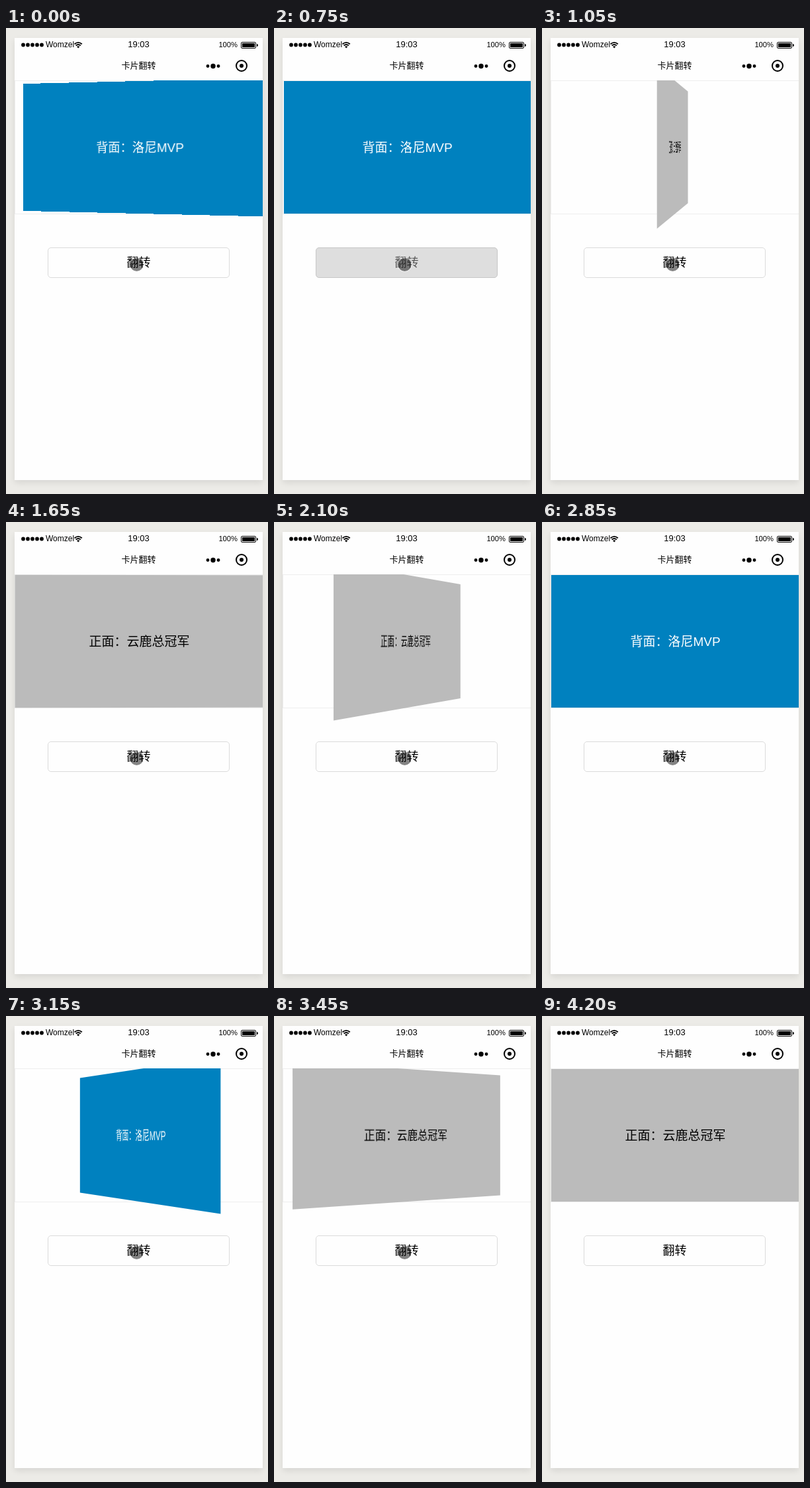
An HTML page that plays this animation: 396 by 703 pixels, repeating every 4.65 s.

```html
<!DOCTYPE html>
<html lang="zh-CN">
<head>
<meta charset="utf-8">
<title>卡片翻转</title>
<style>
  * { box-sizing: border-box; }
  html, body { margin: 0; width: 100%; height: 100%; overflow: hidden; background: #ecebe7; }
  body { position: relative; font-family: "Liberation Sans", "Noto Sans CJK SC", "Noto Sans CJK", sans-serif; }
  body * { position: absolute; }
  .phone { left: 13px; top: 15px; width: 375px; height: 667px; background: #fefefe; box-shadow: 0 4px 9px rgba(0, 0, 0, .09); }
  .page { left: 0; top: 64px; width: 375px; height: 603px; overflow: hidden; }
  .scene { left: 0; top: 0; width: 377px; height: 202px; border: 1px solid #eee; perspective: 1000px; }
  .face { left: 0; top: 0; width: 375px; height: 200px; font-size: 19px; line-height: 201px; text-align: center; backface-visibility: hidden; }
  #front { background: #bbb; color: #000; }
  #back { background: #0081bf; color: #fff; }
  #button { left: 50px; top: 252px; width: 275px; height: 46px; border: 1px solid #dbdbdb; border-radius: 5px; font-size: 18px; line-height: 44px; text-align: center; color: #000; }
  #button.pressed { background: #dedede; border-color: #c6c6c6; color: rgba(0, 0, 0, .6); }
  #cursor { left: -10px; top: -10px; width: 20px; height: 20px; border-radius: 50%; background: rgba(0, 0, 0, .48); box-shadow: 0 0 1px 1px rgba(255, 255, 255, .5); }
  svg { left: 0; top: 0; }
</style>
</head>
<body>
<div class="phone">
  <div class="page">
    <div class="scene">
      <div class="face" id="front">正面：云鹿总冠军</div>
      <div class="face" id="back">背面：洛尼MVP</div>
    </div>
    <div id="button">翻转</div>
  </div>
</div>
<svg width="396" height="80">
  <path d="M26 25.5h28.1" stroke="#000" stroke-width="5.8" stroke-linecap="round" stroke-dasharray="0 7"/>
  <text x="60" y="29" font-size="12">Womzel</text>
  <g fill="none" stroke="#000" stroke-width="1.8">
    <path d="M103.6 24.3q5.6-4.8 11.2 0M105.6 26.5q3.6-3 7.2 0"/>
  </g>
  <path d="M107 28q2.2-1.6 4.4 0l-2.2 2.4z"/>
  <text x="200.5" y="29" font-size="13" text-anchor="middle">19:03</text>
  <text x="350" y="29" font-size="11.2" text-anchor="end">100%</text>
  <rect x="355.5" y="21.5" width="22" height="9" rx="1.5" fill="none" stroke="#000"/>
  <path d="M357 23h19v6h-19zM379 24q2 0 2 2t-2 2z"/>
  <text x="200.5" y="61" font-size="13" text-anchor="middle">卡片翻转</text>
  <circle cx="305" cy="57.5" r="2.4"/>
  <circle cx="313" cy="57.5" r="3.7"/>
  <circle cx="321" cy="57.5" r="2.4"/>
  <circle cx="356" cy="57" r="8" fill="none" stroke="#000" stroke-width="2"/>
  <circle cx="356" cy="57" r="3"/>
</svg>
<div id="cursor"></div>
<script>
  const LOOP = 4650, STEP = 150, FLIP = 1000, HOLD = 70;
  const flips = [
    { start: -670, from: 0, to: 180 },
    { start: 737, from: 180, to: 0 },
    { start: 1883, from: 0, to: 180 },
    { start: 2942, from: 180, to: 0 }
  ];
  const [front, back, button, cursor] =
    ['front', 'back', 'button', 'cursor'].map(id => document.getElementById(id));
  const clamp = v => Math.min(1, Math.max(0, v));
  const bezier = (a, b, u) => 3 * a * u * (1 - u) ** 2 + 3 * b * u * u * (1 - u) + u ** 3;

  // CSS "ease": cubic-bezier(.25, .1, .25, 1)
  function ease(x) {
    let low = 0, high = 1;
    for (let i = 0; i < 24; i++) {
      const mid = (low + high) / 2;
      if (bezier(.25, .25, mid) < x) low = mid; else high = mid;
    }
    return bezier(.1, 1, low);
  }

  function draw(t) {
    const flip = flips.filter(f => f.start <= t).pop();
    const elapsed = t - flip.start;
    const angle = flip.from + (flip.to - flip.from) * ease(clamp(elapsed / FLIP));
    front.style.transform = `rotateY(${angle}deg)`;
    back.style.transform = `rotateY(${angle - 180}deg)`;
    button.classList.toggle('pressed', elapsed < HOLD);

    const leave = 1 - (1 - clamp((t - 3750) / 300)) ** 3;
    cursor.style.transform = `translate(${197.5 + 159 * leave}px, ${357 + 325 * leave}px)`;
    cursor.style.visibility = t < 4200 ? 'visible' : 'hidden';
  }

  const begin = performance.now();
  function tick() {
    const t = (performance.now() - begin) % LOOP;
    draw(Math.floor(t / STEP) * STEP);
    requestAnimationFrame(tick);
  }
  tick();
</script>
</body>
</html>
```
